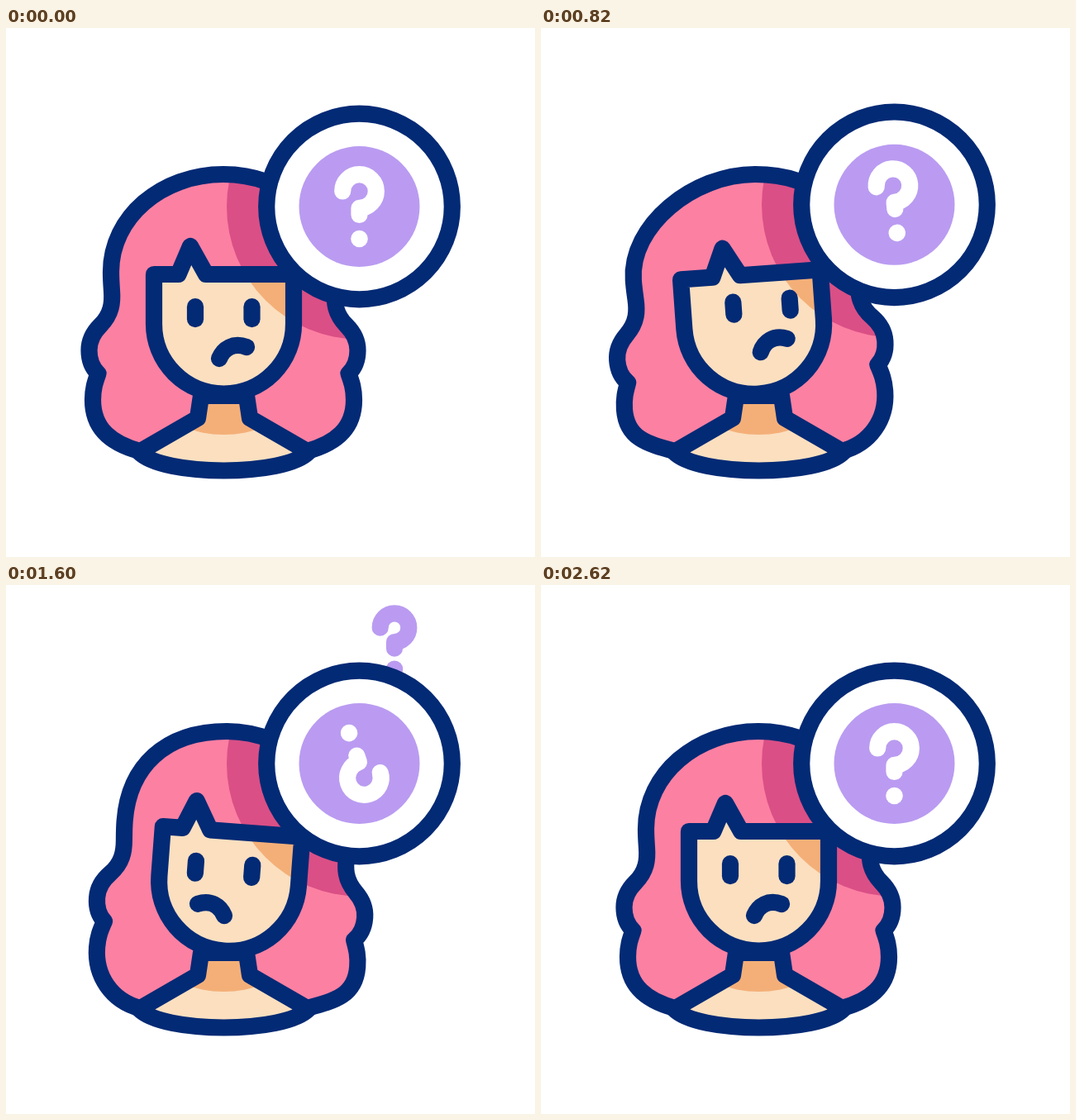
An HTML page with a canvas that plays this animation: 640x640 px, repeating every 3 s.

```html
<!DOCTYPE html>
<html lang="en">
<head>
<meta charset="utf-8">
<title>Thinking woman</title>
<style>
  html, body { margin: 0; height: 100%; overflow: hidden; background: #fff; }
  canvas { display: block; }
</style>
</head>
<body>
<canvas id="stage" width="640" height="640"></canvas>
<script>
const ctx = document.getElementById('stage').getContext('2d');
const LOOP = 3000, TAU = Math.PI * 2, RAD = Math.PI / 180;
const NAVY = '#032a75', PINK = '#fc80a2', ROSE = '#da4f86', SKIN = '#fbdfbf',
      TAN = '#f4af78', LILAC = '#ba9bf1', WHITE = '#fff';

const mix = (a, b, p) => a + (b - a) * p;

// Eased value at time t through [time, value] keys
function key(t, ...keys) {
  if (t <= keys[0][0]) return keys[0][1];
  for (let i = 1; i < keys.length; i++) {
    const [t0, a] = keys[i - 1], [t1, b] = keys[i];
    if (t < t1) {
      const p = (t - t0) / (t1 - t0);
      return mix(a, b, p * p * (3 - 2 * p));
    }
  }
  return keys[keys.length - 1][1];
}

// Head beats: rest, lean left, lean right, rest
const pose = (t, left, right) => key(t, [200, 0], [580, left], [1120, left],
  [1700, right], [2180, right], [2620, 0]);

function stroke(path, color = NAVY) {
  ctx.strokeStyle = color;
  ctx.stroke(path);
}

function fill(path, color) {
  ctx.fillStyle = color;
  ctx.fill(path);
}

function disc(x, y, r, color) {
  const path = new Path2D();
  path.arc(x, y, r, 0, TAU);
  fill(path, color);
}

// Circular shadow of the bubble, kept inside a shape
function shade(shape, y, color) {
  ctx.save();
  ctx.clip(shape);
  ctx.resetTransform();
  disc(427.5, y, 160.5, color);
  ctx.restore();
}

function rotateAbout(x, y, deg) {
  ctx.translate(x, y);
  ctx.rotate(deg * RAD);
  ctx.translate(-x, -y);
}

// Question mark; x, y is the centre of its loop
function question(x, y, r, stem, dot, color) {
  stroke(new Path2D(`M${x - r} ${y}A${r} ${r} 0 1 1 ${x} ${y + r}V${y + stem}`), color);
  disc(x, y + dot, 10.3, color);
}

const MARKS = [
  { x: 161, r: 20.2, stem: 29, dot: 58, rise: [860, 1380], top: [215, 78], fade: [1350, 1500] },
  { x: 470, r: 17.3, stem: 25, dot: 50, rise: [1230, 1728], top: [130, 4], fade: [1680, 1810] },
  { x: 263.5, r: 28, stem: 38, dot: 66, rise: [1630, 2210], top: [173, 13], fade: [2250, 2420] }
];

function drawMarks(t) {
  for (const { x, r, stem, dot, rise, top, fade } of MARKS) {
    if (t < rise[0] || t >= fade[1]) continue;
    const y = key(t, [rise[0], top[0]], [rise[1], top[1]]) + r + 10;
    // Fade by tinting toward white so that overlapping parts do not add up
    const p = Math.max(0, (t - fade[0]) / (fade[1] - fade[0]));
    const color = `rgb(${[186, 155, 241].map(c => mix(c, 255, p))})`;
    question(x, y, r, stem, dot, color);
  }
}

// Left half of the hair from the shoulder to the crown, as cubic segments
const HAIR = [
  [162, 512], [128, 503], [105, 485], [105, 450],
  [105, 436], [108, 428], [111.5, 418],
  [103, 410], [100.5, 401], [100.5, 390],
  [100.5, 376], [107, 367], [114, 360],
  [128, 346], [129, 332], [128, 318],
  [127.4, 309], [127, 304], [127, 295],
  [127, 229], [188, 177], [263, 177]
];

function hairPath(deg) {
  const sin = Math.sin(deg * RAD), cos = Math.cos(deg * RAD), last = HAIR.length - 1;
  const place = ([x, y], i) => {
    if (i < 2) return [x, y];
    if (i >= last - 1) return [x + deg, y];
    const dx = x - 263, dy = y - 512;
    return [263 + dx * cos - dy * sin, 512 + dx * sin + dy * cos];
  };
  const left = HAIR.map(place);
  const right = HAIR.map(([x, y], i) => place([526 - x, y], i)).reverse().slice(1);
  const [start, ...rest] = [...left, ...right];
  return new Path2D(`M${start}C${rest.join(' ')}`);
}

// The parting of the fringe slides along the forehead
const facePath = slide => new Path2D(`M179 298H${208.5 + slide}L${223 + slide} 264
  L${242 + slide} 298H348V358A84.5 84.5 0 0 1 179 358Z`);

const BODY = new Path2D('M236 445L232 472L161 513C190 543 337 543 366 513L295 472L291 445Z');
const MOUTH = [[258, 400], [263, 388], [275, 380], [291, 386]];
const MOUTH_FLIP = MOUTH.map(([x, y]) => [524 - x, y + 2]).reverse();

function drawBody() {
  fill(BODY, SKIN);
  ctx.save();
  ctx.clip(BODY);
  disc(263.5, 358, 134, TAN);
  ctx.restore();
  stroke(BODY);
}

function drawFace(t, deg, bubbleY) {
  const slide = pose(t, 10, -7.6);
  const face = facePath(slide * .9);
  ctx.save();
  rotateAbout(263.5, 440, deg);
  fill(face, SKIN);
  shade(face, bubbleY, TAN);
  stroke(face);
  ctx.restore();

  ctx.save();
  ctx.translate(slide, pose(t, -8.3, -.5));
  rotateAbout(263.5, 432, deg);
  const half = key(t, [1800, 7.5], [1930, .8], [2070, 7.5]);
  for (const x of [229, 297.5]) {
    stroke(new Path2D(`M${x} ${344.7 - half}V${344.7 + half}`));
  }
  const flip = pose(t, 0, 1);
  const [start, ...rest] = MOUTH.map((p, i) => p.map((v, j) => mix(v, MOUTH_FLIP[i][j], flip)));
  stroke(new Path2D(`M${start}C${rest.join(' ')}`));
  ctx.restore();
}

function drawBubble(t, y) {
  const ring = new Path2D();
  ring.arc(427.5, y, 112.3, 0, TAU);
  fill(ring, WHITE);
  stroke(ring);
  disc(427.5, y, 73, LILAC);
  ctx.save();
  ctx.translate(0, key(t, [200, 0], [560, -9], [1100, 0]));
  rotateAbout(427.5, y, -key(t, [705, 0], [2475, 390], [2620, 360]));
  question(427.5, y - 18.5, 20.3, 28.5, 57.5, WHITE);
  ctx.restore();
}

function draw(t) {
  const deg = pose(t, -4.1, 5);
  const bubbleY = 216 + key(t, [200, 0], [560, -24.4], [1100, 22.3], [1460, 0]);
  ctx.fillStyle = WHITE;
  ctx.fillRect(0, 0, 640, 640);
  ctx.lineWidth = 20.2;
  ctx.lineCap = ctx.lineJoin = 'round';

  drawMarks(t);
  const hair = hairPath(deg);
  fill(hair, PINK);
  shade(hair, bubbleY, ROSE);
  stroke(hair);
  drawBody();
  drawFace(t, deg, bubbleY);
  drawBubble(t, bubbleY);
}

const begin = performance.now();
function tick() {
  draw((performance.now() - begin) % LOOP);
  requestAnimationFrame(tick);
}
tick();
</script>
</body>
</html>
```
